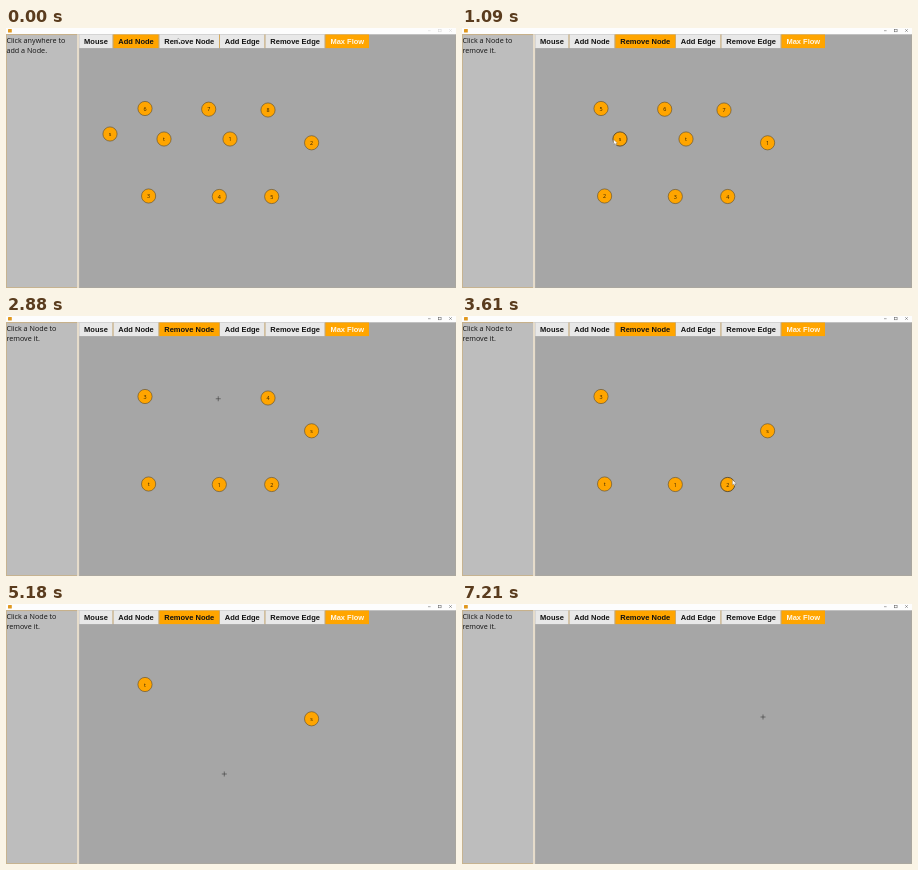
Write an HTML page that moves like this. It is 450 px wide and 260 px high and loops after 7.24 s.

```html
<!DOCTYPE html>
<html lang="en">
<head>
<meta charset="utf-8">
<style>
html, body { margin: 0; width: 100%; height: 100%; overflow: hidden; background: #a6a6a6; }
svg { display: block; width: 450px; height: 260px; }
.button text { font: bold 7.5px "Liberation Sans", Arial, sans-serif; text-anchor: middle; }
.help { font: 7.2px "Open Sans", "Noto Sans", sans-serif; fill: #111; }
.node text { font: 5.4px "Open Sans", "Noto Sans", sans-serif; text-anchor: middle; fill: #2b1c00; }
.node circle { fill: #ffa500; stroke: #5e4a24; stroke-width: .6; }
.node.hover circle { stroke: #4b3a1c; stroke-width: .8; }
</style>
</head>
<body>
<svg viewBox="0 0 450 260" xmlns="http://www.w3.org/2000/svg">
  <rect width="450" height="260" fill="#a6a6a6"/>
  <rect width="450" height="6.3" fill="#fdfdfd"/>
  <rect x="2" y="1" width="3.8" height="3.6" rx=".5" fill="#e0981f"/>
  <rect y="6.3" width="71" height="253.7" fill="#bdbdbd"/>
  <path d="M71 6.6H.3V259.7H71" fill="none" stroke="#d0a862" stroke-width=".6"/>
  <rect x="71" y="6.3" width="2.1" height="253.7" fill="#e6dccb"/>
  <path d="M73 259.8H450M449.8 6.5V260" stroke="#b5aa92" stroke-width=".4"/>
  <g id="windowButtons" fill="none" stroke="#555" stroke-width=".5">
    <path d="M422 2.7h2.6M443.2 1.2l2.6 2.6m0-2.6l-2.6 2.6"/>
    <rect x="432.6" y="1.3" width="2.5" height="2.5"/>
  </g>
  <text class="help" x=".4" y="15.3"></text>
  <text class="help" x=".4" y="24.9"></text>
  <g id="buttons"></g>
  <g id="nodes"></g>
  <g id="cursor">
    <path id="cross" d="M-2.5 0H2.5M0-2.5V2.5" stroke="#333" stroke-width=".55"/>
    <path id="arrow" d="M0 0V5.2L1.3 4.1 2.2 6 3.1 5.6 2.3 3.8H4Z" fill="#fff" stroke="#555" stroke-width=".3"/>
  </g>
</svg>
<script>
const LOOP = 7240, TOOL_CLICK = 110;
const FIRST_REMOVAL = 770, REMOVAL_STEP = 620;
const PAUSE = 110, TRAVEL = 300, RADIUS = 7.1;

const byId = id => document.getElementById(id);
const mix = (a, b, k) => a + (b - a) * k;
const clamp = k => Math.max(0, Math.min(1, k));
const ease = k => k * k * (3 - 2 * k);
const removalTime = i => FIRST_REMOVAL + REMOVAL_STEP * i;

function add(parent, tag, attrs, text = "") {
  const el = document.createElementNS("http://www.w3.org/2000/svg", tag);
  for (const key in attrs) el.setAttribute(key, attrs[key]);
  el.textContent = text;
  parent.append(el);
  return el;
}

// Each button is as wide as its label plus padding.
let left = 73.3;
const buttons = ["Mouse", "Add Node", "Remove Node", "Add Edge", "Remove Edge", "Max Flow"].map(label => {
  const g = add(byId("buttons"), "g", { class: "button" });
  const face = add(g, "rect", { x: left, y: 6.5, height: 13.6 });
  const text = add(g, "text", { y: 16 }, label);
  const width = text.getComputedTextLength() + 9.6;
  face.setAttribute("width", width);
  text.setAttribute("x", left + width / 2);
  left += width;
  if (label !== "Max Flow") add(g, "rect", { x: left, y: 6.5, width: .9, height: 13.6, fill: "#d9aa58" });
  left += .9;
  return { label, face, text };
});

// Creation order decides the labels: s, t, 1, 2, ...
const nodes = [
  { x: 104, y: 106 }, { x: 158, y: 111, pause: 220 }, { x: 224, y: 111 }, { x: 305.6, y: 114.8 },
  { x: 142.6, y: 168 }, { x: 213.3, y: 168.5 }, { x: 265.7, y: 168.5 },
  { x: 139, y: 80.5 }, { x: 202.7, y: 81.2, pause: 200 }, { x: 262, y: 82 }
];
for (const n of nodes) {
  n.g = add(byId("nodes"), "g", { transform: `translate(${n.x} ${n.y})` });
  add(n.g, "circle", { r: RADIUS });
  n.text = add(n.g, "text", { y: 2.1 });
}

const clicked = [0, 1, 2, 8, 9, 6, 4, 5, 7, 3].map(i => nodes[i]);
clicked.forEach((n, i) => n.removed = removalTime(i));

const stops = [
  { x: 172, y: 10 },
  ...clicked.map(({ x, y, pause }) => ({ x: x + 5, y: y + 1.5, pause })),
  { x: 301, y: 113 }
];

function cursorAt(t) {
  const i = Math.max(0, Math.floor((t - removalTime(-1)) / REMOVAL_STEP));
  const from = stops[i], to = stops[Math.min(i + 1, stops.length - 1)];
  const k = ease(clamp((t - removalTime(i - 1) - (from.pause ?? PAUSE)) / TRAVEL));
  return [mix(from.x, to.x, k), mix(from.y, to.y, k)];
}

function render(t) {
  const removing = t >= TOOL_CLICK;
  const active = removing ? "Remove Node" : "Add Node";
  const [x, y] = cursorAt(t);
  const help = document.querySelectorAll(".help");
  help[0].textContent = removing ? "Click a Node to" : "Click anywhere to";
  help[1].textContent = removing ? "remove it." : "add a Node.";
  byId("windowButtons").setAttribute("opacity", removing ? 1 : .25);

  for (const { label, face, text } of buttons) {
    const flow = label === "Max Flow";
    face.setAttribute("fill", flow || label === active ? "#ffa500" : "#e8e8e8");
    text.setAttribute("fill", flow ? "#fff8e8" : "#111");
  }

  const alive = nodes.filter(n => t < n.removed);
  let overNode = false;
  for (const n of nodes) n.g.setAttribute("display", t < n.removed ? "inline" : "none");
  alive.forEach((n, i) => {
    const hover = Math.hypot(x - n.x, y - n.y) < RADIUS;
    overNode ||= hover;
    n.g.setAttribute("class", hover ? "node hover" : "node");
    n.text.textContent = i < 2 ? "st"[i] : i - 1;
  });

  const pointing = overNode || y < 20;
  byId("cursor").setAttribute("transform", `translate(${x} ${y})`);
  byId("cross").setAttribute("display", pointing ? "none" : "inline");
  byId("arrow").setAttribute("display", pointing ? "inline" : "none");
}

const start = performance.now();
function tick() {
  render((performance.now() - start) % LOOP);
  requestAnimationFrame(tick);
}
tick();
</script>
</body>
</html>
```
